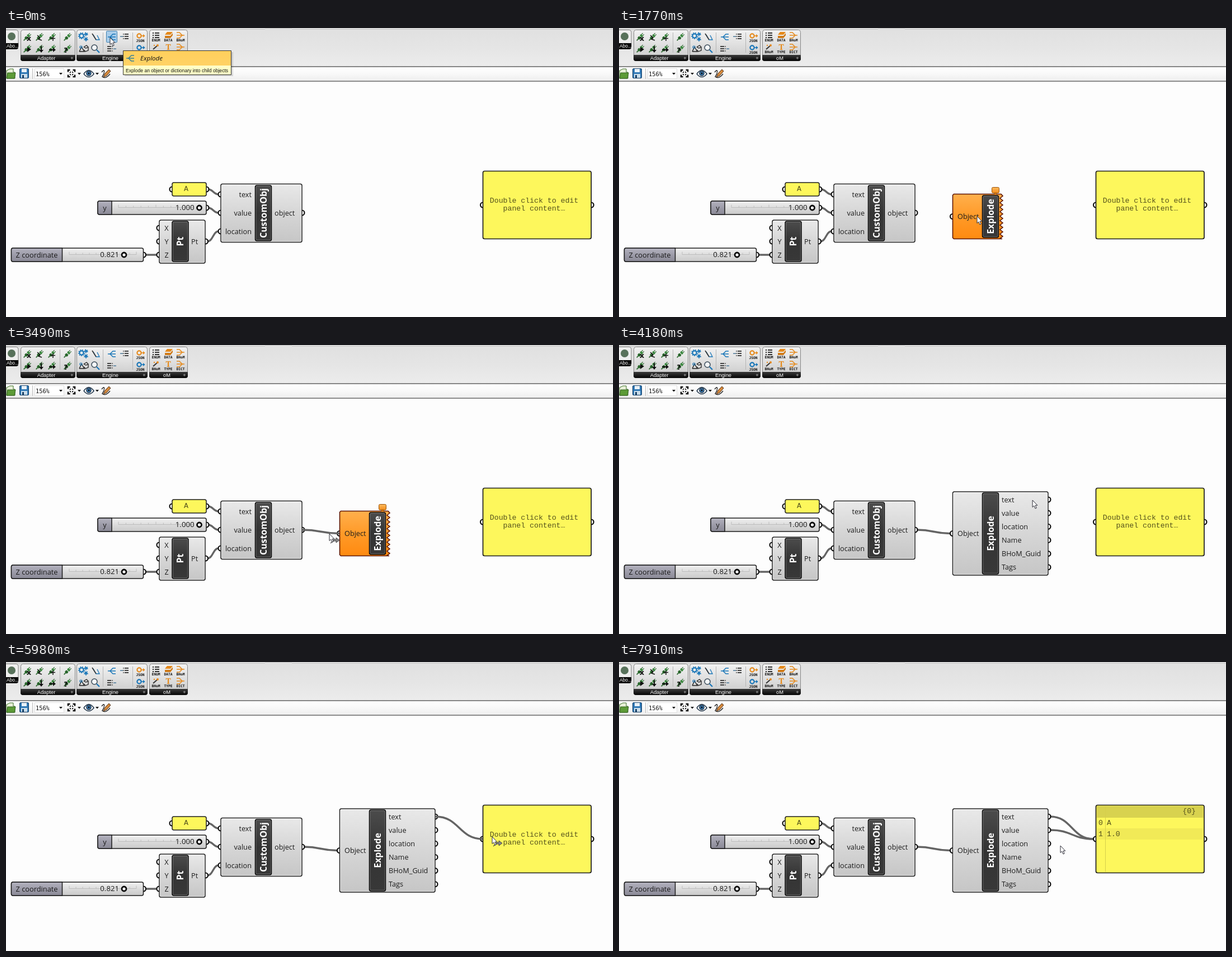
These frames come from a looping animation (1085 by 516 pixels, 7990 ms). An HTML page with a canvas:

```html
<!DOCTYPE html>
<html lang="en">
<head>
<meta charset="utf-8">
<title>Explode component</title>
<style>
html, body { margin: 0; width: 100%; height: 100%; overflow: hidden; background: #fdfdfd; }
canvas { display: block; }
</style>
</head>
<body>
<canvas id="stage" width="1085" height="516"></canvas>
<script>
const c = document.getElementById('stage').getContext('2d');
const LOOP = 7990;
const UI = '"Open Sans", "Noto Sans", sans-serif';
const MONO = '13.2px "Liberation Mono", "Courier New", monospace';
const SMALL = '"Liberation Sans", Arial, sans-serif';
const INK = '#1c1c1c', YELLOW = '#fdf75c', WIRE = '#646464';
const BLUE = '#1976b8', ORANGE = '#e58a1c', GREEN = '#28662b';

// Cursor path: time, x, y
const PATH = [
  [0, 186, 17], [625, 186, 17], [1450, 640, 336], [1850, 640, 336],
  [2400, 524, 327], [2720, 524, 327], [3240, 574, 335], [3390, 576, 336],
  [3490, 578, 337], [3700, 578, 337], [4180, 739, 277], [4410, 763, 277],
  [5200, 764, 277], [5400, 767, 275], [5980, 869, 312], [6140, 869, 312],
  [6910, 765, 298], [7000, 765, 298], [7150, 833, 324], [7380, 854, 326],
  [7460, 854, 326], [7910, 789, 328]
];

// Wires made by hand: dragged from grab, attached at snap, released at drop
const LINKS = [
  { from: [530, 330], to: [596, 336.5], grab: 2790, snap: 3240, drop: 3630 },
  { from: [768, 276], to: [852, 316], grab: 5480, snap: 5850, drop: 6200 },
  { from: [768, 300], to: [852, 316], grab: 7070, snap: 7300, drop: 7520 }
];

function cursorAt(t) {
  const i = PATH.findIndex(p => p[0] > t);
  if (i < 0) return PATH[PATH.length - 1].slice(1);
  const [t0, x0, y0] = PATH[i - 1], [t1, x1, y1] = PATH[i];
  let k = (t - t0) / (t1 - t0);
  if (t1 - t0 > 350) k = k * k * (3 - 2 * k);
  return [x0 + (x1 - x0) * k, y0 + (y1 - y0) * k];
}

function rect(x, y, w, h, fill) {
  c.fillStyle = fill;
  c.fillRect(x, y, w, h);
}

function paint(fill, stroke, lw) {
  if (fill) { c.fillStyle = fill; c.fill(); }
  if (stroke) { c.strokeStyle = stroke; c.lineWidth = lw; c.stroke(); }
}

function box(x, y, w, h, r, fill, stroke, lw = 1) {
  c.beginPath();
  c.roundRect(x, y, w, h, r);
  paint(fill, stroke, lw);
}

function shape(pts, fill, stroke, lw = 1) {
  c.beginPath();
  for (let i = 0; i < pts.length; i += 2) c.lineTo(pts[i], pts[i + 1]);
  if (fill) c.closePath();
  paint(fill, stroke, lw);
}

function circle(x, y, r, fill, stroke, lw = 1) {
  c.beginPath();
  c.arc(x, y, r, 0, 7);
  paint(fill, stroke, lw);
}

function text(s, x, y, font = '12.7px ' + UI, color = INK, align = 'left') {
  c.font = font;
  c.fillStyle = color;
  c.textAlign = align;
  c.fillText(s, x, y);
}

function fade(y0, y1, ...colors) {
  const g = c.createLinearGradient(0, y0, 0, y1);
  colors.forEach((col, i) => g.addColorStop(i / (colors.length - 1), col));
  return g;
}

function at(x, y, draw) {
  c.save();
  c.translate(x, y);
  draw();
  c.restore();
}

/* ---------- ribbon and toolbar ---------- */

function plug(x, y) {
  at(x, y, () => {
    c.rotate(-Math.PI / 4);
    shape([-9, 0, -4, 0], null, GREEN, 1.6);
    box(-5, -2.8, 5, 5.6, 2, GREEN);
    box(1, -2.8, 4, 5.6, 1.5, '#3c8a40');
    shape([5, -1.5, 8, -1.5], null, GREEN, 1.2);
    shape([5, 1.5, 8, 1.5], null, GREEN, 1.2);
  });
}

function branch(x, y, col, flip = 1) {
  at(x, y, () => {
    c.scale(flip, 1);
    shape([-7, 0, 7, 0], null, col, 1.5);
    shape([7, -5, 2, -5, -3, 0, 2, 5, 7, 5], null, col, 1.5);
  });
}

function list(x, y, side) {
  for (let i = -1; i < 2; i++) {
    rect(x + (side > 0 ? 0 : -7), y + i * 4 - 1, 7, 2, '#444');
    rect(x + (side > 0 ? -3 : 1), y + i * 4 - 1, 2, 2, '#777');
  }
  rect(x + (side > 0 ? -8 : 4), y - .5, 5, 1.5, '#4d7a9a');
}

function gear(x, y, r) {
  c.setLineDash([1.8, 1.6]);
  circle(x, y, r + 1, null, BLUE, 2);
  c.setLineDash([]);
  circle(x, y, r - 0.5, null, BLUE, 2);
}

function tag(s, x, y) {
  text(s, x, y, 'bold 6.3px "DejaVu Sans Mono", monospace', '#111', 'center');
}

function group(x, w, label) {
  box(x + .5, 3.5, w - 1, 55, 4, fade(3, 50, '#f2f2f2', '#e2e2e2', '#cfcfcf'), '#858585');
  box(x, 48, w, 11, [1, 1, 4, 4], fade(48, 59, '#3a3a3a', '#050505'));
  text(label, x + w / 2 - 3, 57, '9.3px ' + SMALL, '#fff', 'center');
  text('+', x + w - 6, 57, '9px ' + SMALL, '#ccc', 'center');
}

function json(y, col) {
  circle(238, y, 3.6, null, col, 2.2);
  shape([242, y, 248, y], null, col, 1.5);
  shape([245, y - 3, 248.5, y, 245, y + 3], col);
  tag('JSON', 240, y + 10.5);
}

function ribbon(hover) {
  rect(0, 0, 1085, 69, fade(0, 69, '#e0e0e0', '#e5e5e5', '#ececec'));
  rect(0, 0, 1085, 1, '#f8f8f8');
  rect(0, 1, 463, 1, '#b4b4b4');
  rect(511, 1, 574, 1, '#b4b4b4');
  rect(463, 0, 48, 1, '#c0c0c0');

  box(-4, 3.5, 26, 34, 4, '#eee', '#858585');
  circle(10, 15, 7, '#58725b');
  box(-4, 27, 26, 11, [0, 0, 4, 0], '#080808');
  text('Abo...', 1, 35, '8.4px ' + SMALL, '#fff');

  group(26, 98, 'Adapter');
  group(126, 127, 'Engine');
  group(256, 69, 'oM');
  for (const x of [96, 173, 226]) rect(x, 8, 1, 36, '#b5b5b5');

  for (const y of [16, 37]) for (const x of [38, 60, 82, 110]) plug(x, y);
  const mark = (s, x, y) => text(s, x, y, 'bold 13px "DejaVu Sans", sans-serif', '#111', 'center');
  mark('x', 41, 23);
  shape([56, 13, 61, 17, 58, 20, 64, 22], null, '#111', 1.5);
  mark('+', 84, 23);
  shape([38, 34, 45, 38, 38, 43], '#111');
  shape([63, 32, 63, 42], null, '#111', 2);
  shape([59, 39, 63, 44, 67, 39], '#111');
  shape([77, 39, 86, 39], null, '#111', 2);
  shape([84, 35, 89, 39, 84, 43], '#111');
  mark('?', 107, 44);

  gear(135, 14, 4);
  gear(143, 11, 1.6);
  gear(143, 20, 1.8);
  shape([156, 12, 161, 21, 167, 21, 163, 13], null, BLUE, 1.3);
  shape([154, 10, 161, 21], null, '#333', 1.6);
  if (hover) box(179.5, 5.5, 19, 20, 1, '#a9cdea', '#3f7fae');
  branch(189, 16, BLUE);
  list(212, 15, 1);
  list(188, 37, -1);
  shape([139, 34, 144, 31, 147, 34, 147, 40, 142, 42, 139, 39], null, '#222', 1.3);
  shape([139, 34, 143, 36, 147, 34], null, '#222', 1.2);
  shape([131, 42, 135, 34, 140, 42, 131, 42], null, '#222', 1.4);
  circle(134, 34, 2, null, BLUE, 1.2);
  circle(158, 35, 5, '#f4f8fb', '#3b4b58', 1.5);
  shape([162, 39, 167, 44], null, BLUE, 2.2);

  json(14, ORANGE);
  json(35, BLUE);
  for (let i = 0; i < 3; i++) {
    rect(262, 8 + i * 4, 2, 2, '#222');
    rect(266, 8 + i * 4, 8, 2, '#333');
  }
  shape([284, 12, 288, 7, 298, 7, 294, 12], ORANGE);
  shape([284, 14, 294, 14, 298, 9, 298, 13, 294, 18, 284, 18], '#cf7a18');
  branch(312, 13, ORANGE, -1);
  shape([263, 38, 271, 31], null, '#333', 2);
  circle(271, 31, 2, ORANGE);
  circle(265, 31, 1.2, ORANGE);
  text('T', 290, 39, 'bold 14px "Noto Serif", serif', ORANGE, 'center');
  branch(312, 34, ORANGE, -1);
  ['ENUM', 'DATA', 'BHoM'].forEach((s, i) => tag(s, 268 + i * 22, 24));
  ['BHoM', 'TYPE', 'DICT'].forEach((s, i) => tag(s, 268 + i * 22, 45));
}

function toolbar() {
  rect(0, 68, 1085, 2, '#868686');
  rect(0, 70, 1085, 25, fade(70, 95, '#ffffff', '#f8f8f8', '#ededed'));
  rect(0, 94, 1085, 2, '#8c8c8c');

  shape([1, 76, 7, 73, 13, 73, 13, 79, 16, 79, 16, 90, 1, 90], '#e8f0d8', '#3a6d25');
  shape([1, 90, 3, 80, 17, 80, 15, 90], '#5d9b37', '#33631f');
  box(24.5, 72.5, 16, 17, 1.5, '#2f78b5', '#163f66');
  rect(28, 73, 9, 6, '#eaf2f8');
  rect(27, 82, 11, 7, '#c9dcea');
  rect(29, 84, 3, 5, '#163f66');
  rect(47, 72, 1, 19, '#bbb');
  box(51.5, 72.5, 52, 18, 0, '#fff', '#dedede');
  text('156%', 53, 85.5, '10.3px "DejaVu Sans Mono", monospace', '#111');
  for (const x of [98, 131, 163]) shape([x - 3, 80, x + 3, 80, x, 83.5], '#111');

  for (const sx of [-1, 1]) for (const sy of [-1, 1]) at(117, 81, () => {
    c.scale(sx, sy);
    shape([6, 2.5, 6, 6, 2.5, 6], null, '#111', 2.6);
    shape([1, 1, 4, 1, 1, 4], '#111');
  });
  c.beginPath();
  c.moveTo(139, 82);
  c.quadraticCurveTo(148, 69, 157, 82);
  c.quadraticCurveTo(148, 93, 139, 82);
  paint('#fff', '#24384c', 1.6);
  circle(148, 81, 4.2, '#3d78ac', '#182c40', 1.2);
  circle(148, 81, 1.7, '#0b1520');

  c.beginPath();
  c.moveTo(171, 79);
  c.bezierCurveTo(178, 70, 176, 82, 172, 87);
  c.bezierCurveTo(177, 91, 182, 87, 186, 82);
  paint(null, '#222', 1.3);
  shape([174, 88, 177, 81, 184, 74, 187, 77, 180, 85], '#d58a3e', '#4c2a10');
}

function tooltip() {
  rect(212, 43, 194, 43, 'rgba(0,0,0,.13)');
  box(209.5, 40.5, 193, 43, 0, '#ffffc6', '#333');
  rect(210, 41, 192, 26, fade(41, 67, '#ffcf5c', '#ffd265'));
  branch(222, 54, '#34809a');
  text('Explode', 240, 58, 'italic 11.6px ' + UI, '#111');
  text('Explode an object or dictionary into child objects', 214, 79, '8.58px ' + SMALL, '#111');
}

/* ---------- canvas nodes ---------- */

function grip(x, y) {
  circle(x, y, 4.5, '#fff', '#0c0c0c', 2.1);
}

function wire(x0, y0, x1, y1, dashed) {
  const d = (x1 - x0) * 0.5;
  c.beginPath();
  c.moveTo(x0, y0);
  c.bezierCurveTo(x0 + d, y0, x1 - d, y1, x1, y1);
  if (dashed) c.setLineDash([7, 3]);
  paint(null, dashed ? '#050505' : WIRE, 3.4);
  c.setLineDash([]);
}

function dragWire(x0, y0, x1, y1) {
  wire(x0, y0, x1 - 5, y1, true);
  shape([x1 - 15, y1 - 6, x1 + 1, y1, x1 - 15, y1 + 6, x1 - 11, y1], '#050505');
}

function body(x, y, w, h) {
  box(x, y, w, h, 3, fade(y, y + h, '#e9e9e9', '#d6d6d6', '#c6c6c6'), INK, 1.5);
  box(x + 1.3, y + 1.3, w - 2.6, h - 2.6, 2, null, 'rgba(255,255,255,.55)');
}

function plate(s, x, y, h) {
  box(x, y, 29, h, 3, fade(y, y + h, '#4c4c4c', '#343434', '#383838'), '#080808', 1.5);
  box(x + 1.3, y + 1.3, 26.4, h - 2.6, 2, null, 'rgba(255,255,255,.25)');
  at(x + 20, y + h / 2, () => {
    c.rotate(-Math.PI / 2);
    text(s, 0, 0, 'bold 16px ' + UI, '#fff', 'center');
  });
}

function slider(name, x, y, w, nameW, x0, x1, value, knob) {
  grip(x + w, y + 12);
  box(x, y, w, 24, 3, fade(y, y + 24, '#f2f2f2', '#dcdcdc', '#c9c9c9'), INK, 1.5);
  box(x, y, nameW, 24, [3, 0, 0, 3], fade(y, y + 24, '#b4b3bf', '#9d9ca9', '#8b8a97'), INK, 1.5);
  text(name, x + nameW / 2, y + 16.7, '12.8px ' + UI, INK, 'center');
  const mid = y + 11.5;
  shape([x0, mid, x1, mid], null, '#bdbdbd');
  for (let i = 0; i <= 10; i++) {
    const tx = x0 + (x1 - x0) * i / 10, len = i % 5 ? 3 : 5;
    shape([tx, mid - len, tx, mid], null, '#bdbdbd');
  }
  text(value, knob - 9, y + 16, '13.2px ' + UI, INK, 'right');
  circle(knob, y + 12, 4, '#fff', '#080808', 2.8);
}

function inputs() {
  wire(361, 288, 380, 297);
  wire(361, 321, 380, 330);
  wire(360, 381, 380, 363);
  wire(249, 405, 271, 405);

  grip(297, 288);
  grip(358, 288);
  box(297, 276, 61, 24, 3, YELLOW, INK, 1.5);
  text('A', 322, 291, MONO, '#55521c', 'center');

  slider('y', 164, 309, 194, 25, 201, 335, '1.000', 345.5);
  slider('Z coordinate', 9.5, 393, 236, 91, 113, 233, '0.821', 211);

  ['X', 'Y', 'Z'].forEach((s, i) => grip(274, 357 + i * 24));
  grip(356.5, 381);
  body(274, 343, 82, 77);
  ['X', 'Y', 'Z'].forEach((s, i) => text(s, 287, 361.5 + i * 24, undefined, INK, 'center'));
  text('Pt', 331, 385.5);
  plate('Pt', 297, 345, 72);

  ['text', 'value', 'location'].forEach((s, i) => grip(384, 297 + i * 33));
  grip(529, 330);
  body(384, 278.5, 145, 104);
  ['text', 'value', 'location'].forEach((s, i) =>
    text(s, 439, 301.5 + i * 33, undefined, INK, 'right'));
  text('object', 480, 335);
  plate('CustomObj', 445.5, 281, 99);
}

function warning() {
  grip(596.5, 336.5);
  const edge = [596.5, 374.5, 596.5, 298.5, 598.5, 296.5, 683, 296.5];
  for (let y = 300; y < 373; y += 8) edge.push(686, y, 681, y + 4);
  edge.push(685, 376.5, 598.5, 376.5, 596.5, 374.5);
  shape(edge, fade(296, 377, '#ffb04d', '#ff9a28', '#ff8a10'), '#5c1606', 1.6);
  text('Object', 605, 341);
  plate('Explode', 649.5, 299, 75);
  box(666.5, 284.5, 13, 10, 2, fade(284, 295, '#ffbd62', '#f08a17'), '#9a5208');
  shape([670, 295, 673, 298, 676, 295], '#d87b12');
}

function exploded() {
  const outs = ['text', 'value', 'location', 'Name', 'BHoM_Guid', 'Tags'];
  grip(596.5, 336.5);
  outs.forEach((s, i) => grip(767, 276 + i * 24.15));
  body(596.5, 262, 170.5, 149);
  text('Object', 605, 341);
  outs.forEach((s, i) => text(s, 684, 280.7 + i * 24.15));
  plate('Explode', 649.5, 264, 145);
}

function panel(rows) {
  grip(852.5, 316);
  grip(1046, 316);
  box(852.5, 255.5, 193.5, 121, 3, YELLOW, INK, 1.7);
  const ink = '#55521c';
  if (!rows) {
    text('Double click to edit', 944, 311.5, MONO, ink, 'center');
    text('panel content…', 944, 326, MONO, ink, 'center');
    return;
  }
  rect(854, 257, 190.5, 21, '#d8d24f');
  if (rows > 1) rect(854, 297, 190.5, 20, '#f1ea57');
  rect(869, 258, 1, 117, '#d6cf4b');
  text('{0}', 1031, 270, MONO, ink, 'right');
  ['A', '1.0'].slice(0, rows).forEach((s, i) => {
    text(String(i), 857, 291 + i * 20, MONO, ink);
    text(s, 872, 291 + i * 20, MONO, ink);
  });
}

function cursor(x, y, linking, adding) {
  at(x, y, () => {
    if (linking) {
      const col = adding ? '#3f9a2e' : '#888';
      shape([2, 17, 8, 10, 12, 10, 12, 7, 18, 11.5, 12, 16, 12, 13, 8, 13], col, '#222', .7);
    }
    if (adding) {
      box(11.5, 1.5, 5, 5, 0, '#fff', '#222');
      rect(13, 3, 2, 2, '#222');
    }
    shape([0, 0, 0, 12.5, 2.8, 10, 5, 15, 7.2, 14, 5, 9.2, 8.8, 9.2, 0, 0], '#fff', '#2b2b35', 1);
  });
}

function frame(t) {
  const [x, y] = cursorAt(t);
  rect(0, 0, 1085, 516, '#fdfdfd');
  ribbon(t < 670);
  toolbar();
  if (t < 670) tooltip();

  // Released wires run below the nodes, held ones above
  for (const { from, to, drop } of LINKS)
    if (t >= drop) wire(from[0] + 3, from[1], to[0] - 4, to[1]);
  inputs();
  if (t >= 3630) exploded();
  else if (t >= 1770) warning();
  panel(t >= 7520 ? 2 : t >= 6200 ? 1 : 0);
  for (const { from, to, grab, snap, drop } of LINKS) {
    if (t >= snap && t < drop) wire(...from, ...to);
    else if (t >= grab && t < snap) dragWire(...from, x + 5, y - 2);
  }

  const adding = t >= 7070 && t < 7520;
  const linking = adding || t >= 2790 && t < 3630 || t >= 4650 && t < 6200;
  cursor(x, y, linking, adding);
}

const start = performance.now();
function tick(now) {
  frame(Math.max(0, now - start) % LOOP);
  requestAnimationFrame(tick);
}
frame(0);
requestAnimationFrame(tick);
</script>
</body>
</html>
```
